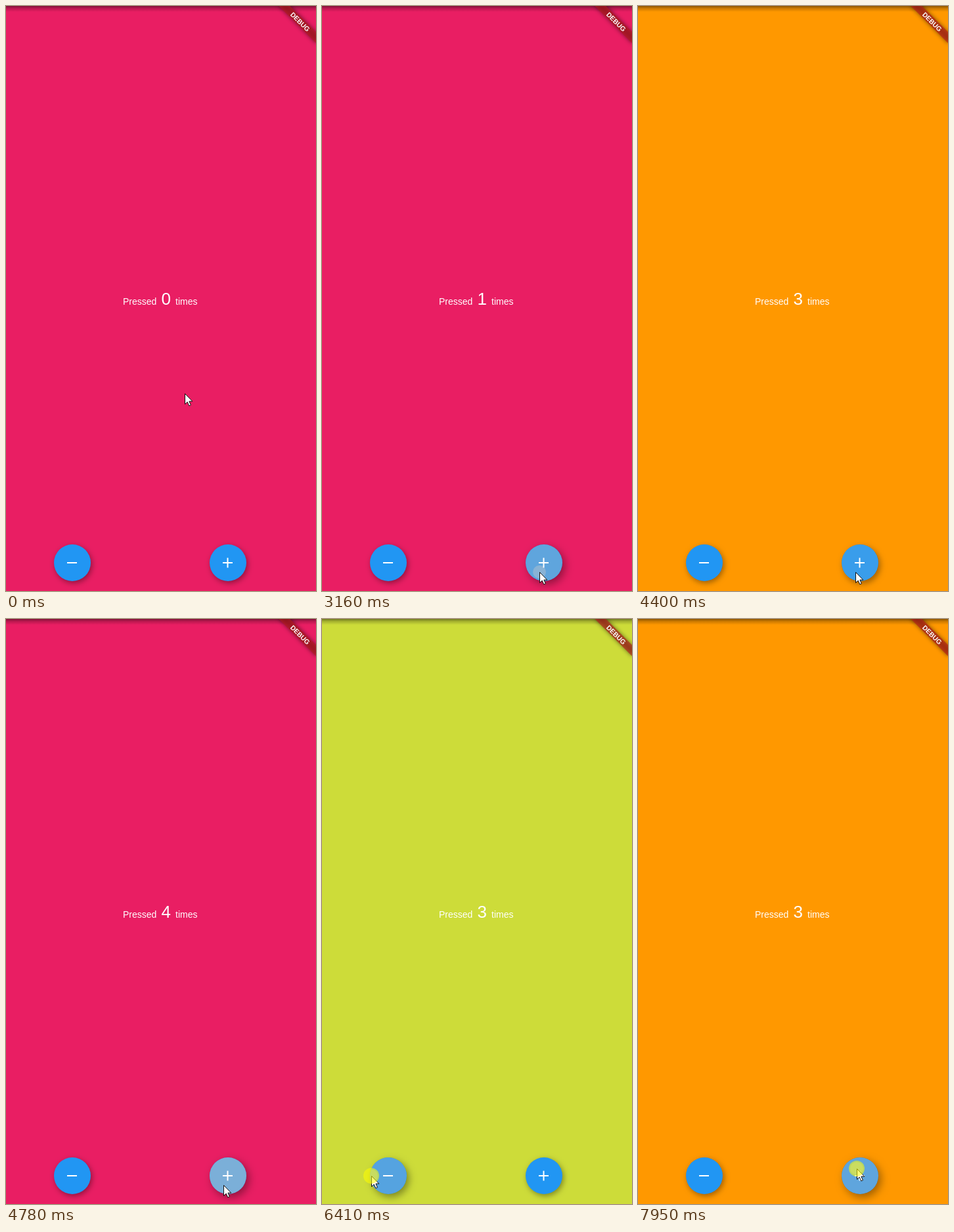
Write an HTML page with a canvas that moves like this. It is 472x891 px and loops after 8 s.

```html
<!DOCTYPE html>
<html lang="en">
<head>
<meta charset="utf-8">
<title>Counter</title>
<style>
  html, body { margin: 0; width: 100%; height: 100%; overflow: hidden; }
  canvas { display: block; }
</style>
</head>
<body>
<canvas id="stage" width="472" height="891"></canvas>
<script>
const ctx = document.getElementById('stage').getContext('2d');
const W = 472, H = 891, LOOP = 8000;
const START = 1140, TICK = 77.4;  // the screen refreshes once per tick
const PINK = '#e91e63', BLUE = '#2196f3', ORANGE = '#ff9800', LIME = '#cddc39';
const FONT = '"Liberation Sans", Arial, sans-serif';
const MINUS = { x: 101, y: 848 }, PLUS = { x: 338, y: 848 }, RADIUS = 28;

// Times below are in ticks.
const states = [
  { at: -1, count: 0, color: PINK },
  { at: 16, count: 1, color: PINK },
  { at: 27, count: 2, color: BLUE },
  { at: 40, count: 3, color: ORANGE },
  { at: 47, count: 4, color: PINK },
  { at: 62, count: 3, color: LIME },
  { at: 69, count: 2, color: ORANGE },
  { at: 86, count: 3, color: ORANGE }
];
const presses = [
  { button: PLUS, down: 12, up: 15, fadeIn: 3 },
  { button: PLUS, down: 24, up: 26, fadeIn: 2 },
  { button: PLUS, down: 37, up: 39.5, fadeIn: 2 },
  { button: PLUS, down: 44, up: 46, fadeIn: 2 },
  { button: MINUS, down: 58, up: 61, fadeIn: 2.5 },
  { button: MINUS, down: 66, up: 68.5, fadeIn: 2.5 },
  { button: PLUS, down: 83, up: 85, fadeIn: 2 },
  { button: PLUS, down: 86, up: 90, fadeIn: 2 }
];
const moves = [
  { from: -1, to: 9, path: [[272, 590], [350, 700], [331, 862]] },
  { from: 48, to: 55, path: [[331, 862], [205, 862], [75, 848]] },
  { from: 72, to: 80, path: [[75, 848], [200, 862], [333, 837]] }
];

const clamp = v => Math.max(0, Math.min(1, v));
const ease = v => v * v * (3 - 2 * v);

function circle(x, y, r, fill) {
  ctx.fillStyle = fill;
  ctx.beginPath();
  ctx.arc(x, y, r, 0, Math.PI * 2);
  ctx.fill();
}

function shadow(color, blur, x, y) {
  ctx.shadowColor = color;
  ctx.shadowBlur = blur;
  ctx.shadowOffsetX = x;
  ctx.shadowOffsetY = y;
}

function pointerAt(k) {
  const move = moves.filter(m => k >= m.from).pop();
  const p = ease(clamp((k - move.from) / (move.to - move.from)));
  const [a, b, c] = move.path;
  const axis = i => (1 - p) ** 2 * a[i] + 2 * p * (1 - p) * b[i] + p * p * c[i];
  return { x: Math.round(axis(0)), y: Math.round(axis(1)) };
}

function highlightOf(press, k) {
  if (k < press.down) return 0;
  const shown = clamp((k - press.down + 0.1) / press.fadeIn);
  return k < press.up ? shown : clamp((press.up + 3 - k) / 2);
}

function drawTopShadow() {
  const g = ctx.createLinearGradient(0, 0, 0, 9);
  g.addColorStop(0, 'rgba(0,0,0,0.45)');
  g.addColorStop(0.4, 'rgba(0,0,0,0.2)');
  g.addColorStop(1, 'rgba(0,0,0,0)');
  ctx.fillStyle = g;
  ctx.fillRect(0, 0, W, 9);
}

function drawBanner() {
  ctx.save();
  ctx.translate(W, 0);
  ctx.rotate(Math.PI / 4);
  ctx.save();
  ctx.filter = 'blur(3px)';
  ctx.fillStyle = 'rgba(0,0,0,0.5)';
  ctx.fillRect(-40, 28, 80, 12);
  ctx.restore();
  ctx.fillStyle = 'rgba(183,28,28,0.627)';
  ctx.fillRect(-40, 28, 80, 12);
  ctx.fillStyle = '#fff';
  ctx.font = `bold 10.2px ${FONT}`;
  ctx.textAlign = 'center';
  ctx.fillText('DEBUG', 0, 37.7);
  ctx.restore();
}

function drawLabel(count) {
  ctx.fillStyle = '#fff';
  ctx.textAlign = 'left';
  ctx.font = `14px ${FONT}`;
  ctx.fillText('Pressed', 178, 455);
  ctx.fillText('times', 258, 455);
  ctx.font = `26px ${FONT}`;
  ctx.fillText(count, 236.5, 455);
}

function drawButton(button, k, pointer) {
  const { x, y } = button;
  const active = presses.filter(p => p.button === button && k >= p.down && k < p.up + 3);
  const highlight = Math.max(0, ...active.map(p => highlightOf(p, k)));
  const hover = Math.hypot(pointer.x - x, pointer.y - y) < RADIUS + 1 ? 0.35 : 0;
  const lift = Math.max(hover, highlight);

  ctx.save();
  shadow('rgba(0,0,0,0.38)', 8 + 5 * lift, 2 + 2 * lift, 3 + 2 * lift);
  circle(x, y, RADIUS, BLUE);
  ctx.restore();

  ctx.save();
  ctx.beginPath();
  ctx.arc(x, y, RADIUS, 0, Math.PI * 2);
  ctx.clip();
  circle(x, y, RADIUS, `rgba(188,188,188,${0.4 * highlight})`);
  for (const p of active) {
    const held = Math.min(k, p.up) - p.down;
    const released = Math.max(0, k - p.up);
    const radius = 1 + held * 4.5 + released * 55;
    const alpha = 0.4 * clamp(1 - released / 2.9);
    circle(pointer.x, pointer.y, radius, `rgba(200,200,200,${alpha})`);
  }
  ctx.restore();

  ctx.fillStyle = '#fff';
  ctx.fillRect(x - 8, y - 1, 15, 2);
  if (button === PLUS) ctx.fillRect(x - 1.5, y - 7.5, 2, 15);
}

function drawPointer({ x, y }) {
  const outline = [[0, 0], [0, 16], [3.7, 12.6], [6.3, 18.4], [8.9, 17.3], [6.4, 11.6], [11.3, 11.6]];
  ctx.beginPath();
  outline.forEach(([dx, dy]) => ctx.lineTo(x + dx + 0.5, y + dy + 0.5));
  ctx.closePath();
  ctx.fillStyle = '#fff';
  ctx.fill();
  ctx.strokeStyle = '#111';
  ctx.lineWidth = 1;
  ctx.stroke();
}

function draw(time) {
  const k = Math.max(-1, Math.floor((time - START) / TICK + 0.15));
  const state = states.filter(s => k >= s.at).pop();
  const pointer = pointerAt(k);

  ctx.fillStyle = state.color;
  ctx.fillRect(0, 0, W, H);
  drawTopShadow();
  drawLabel(state.count);
  drawButton(MINUS, k, pointer);
  drawButton(PLUS, k, pointer);
  drawBanner();
  drawPointer(pointer);
  if (presses.some(p => k >= p.down && k < p.up)) {
    circle(pointer.x, pointer.y, 12, 'rgba(255,255,0,0.55)');
  }
}

const origin = performance.now();
function frame() {
  draw((performance.now() - origin) % LOOP);
  requestAnimationFrame(frame);
}
frame();
</script>
</body>
</html>
```
